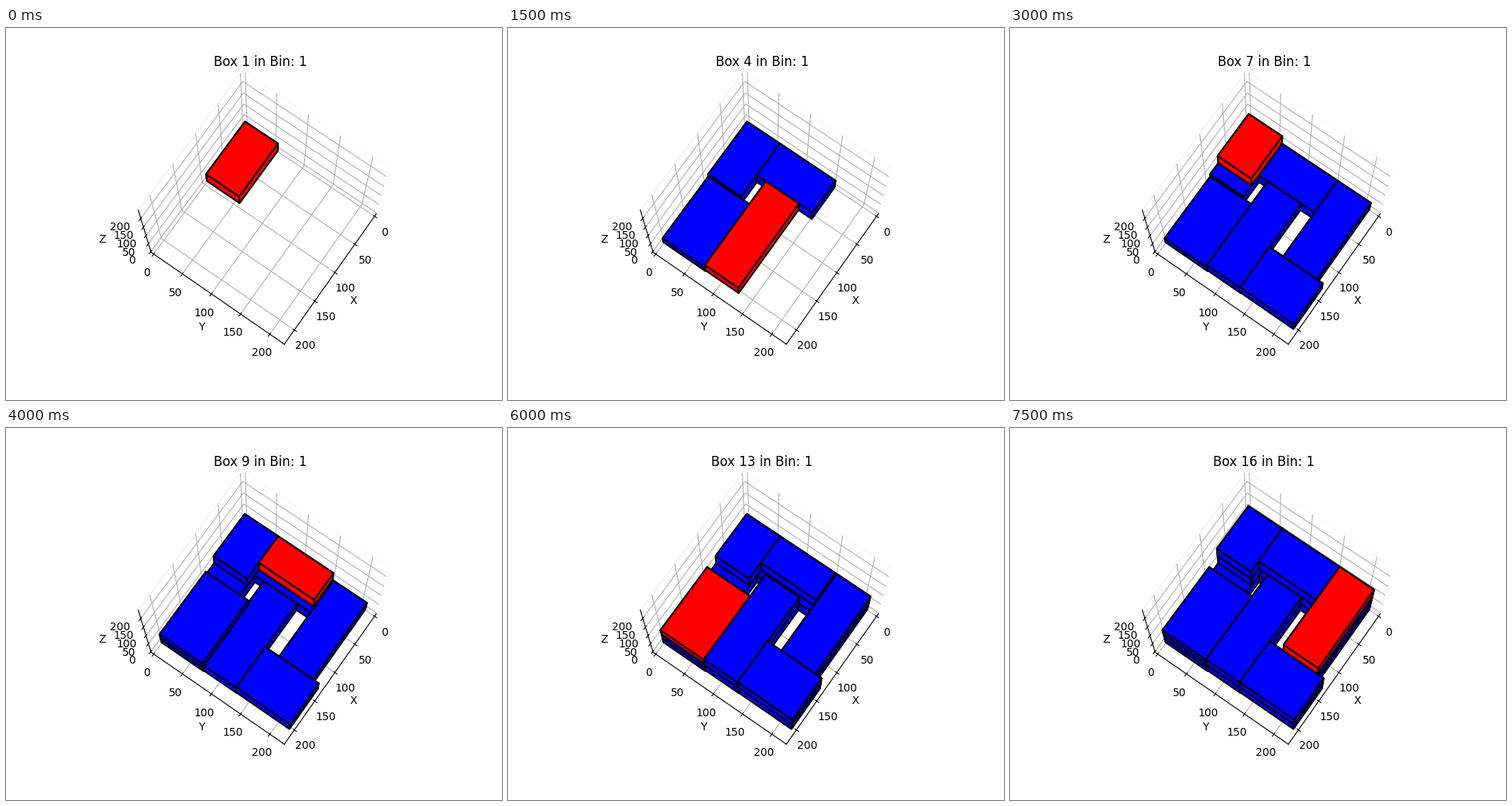
Recreate the animation shown at these times as a matplotlib script. Size 640 by 480 pixels, loop 8000 ms.

```python
from itertools import product

import matplotlib.pyplot as plt
import numpy as np
from matplotlib.animation import FuncAnimation
from mpl_toolkits.mplot3d.art3d import Poly3DCollection

BIN = (220, 220, 240)
MARGIN = 1 / 48
H, LOW = 37, 25

# position (x, y, z) and size (dx, dy, dz), in packing order
BOXES = [
    (0, 0, 0, 95, 57, H),
    (95, 0, 0, 110, 72.5, LOW),
    (0, 57, 0, 57, 95, H),
    (57, 72.5, 0, 147, 56.5, H),
    (133.5, 128.5, 0, 70, 90, H),
    (0, 152, 0, 133.5, 56.5, H),
    (0, 0, H, 75, 57, H),
    (95, 0, LOW, 110, 72.5, LOW),
    (0, 57, H, 47, 93, H),
    (0, 152, H, 133.5, 56.5, H),
    (57, 72.5, H, 147, 56.5, H),
    (133.5, 128.5, H, 70, 90, H),
    (95, 0, 2 * LOW, 110, 72.5, LOW),
    (0, 0, 2 * H, 75, 57, H),
    (0, 57, 2 * H, 57, 95, H),
    (0, 152, 2 * H, 133.5, 56.5, H),
]


def faces(box):
    """Six quads of a cuboid."""
    pos, size = np.array(box[:3]), np.array(box[3:])
    quads = []
    for axis, side in product(range(3), (0, 1)):
        u, v = [k for k in range(3) if k != axis]
        quad = np.zeros((4, 3))
        quad[:, axis] = side
        quad[:, u] = (0, 1, 1, 0)
        quad[:, v] = (0, 0, 1, 1)
        quads.append(pos + quad * size)
    return quads


fig = plt.figure(figsize=(6.4, 4.8), dpi=100)
ax = fig.add_subplot(projection="3d")
ax.set(xlabel="X", ylabel="Y", zlabel="Z")
ax.set_box_aspect((1, 1, 1))
ax.view_init(elev=75, azim=35)
for axis in (ax.xaxis, ax.yaxis, ax.zaxis):
    axis.pane.fill = False
    axis.set_ticks(range(0, 201, 50))
for set_lim, size in zip((ax.set_xlim, ax.set_ylim, ax.set_zlim), BIN):
    set_lim(0, size, view_margin=MARGIN)

solids = [
    ax.add_collection3d(
        Poly3DCollection(faces(box), facecolors="b", edgecolors="k", linewidths=1.5))
    for box in BOXES
]
title = ax.set_title("")


def update(i):
    for k, solid in enumerate(solids):
        solid.set_visible(k <= i)
        solid.set_facecolor("r" if k == i else "b")
    title.set_text(f"Box {i + 1} in Bin: 1")
    return [*solids, title]


anim = FuncAnimation(fig, update, frames=len(BOXES), interval=500,
                     repeat=True, repeat_delay=0, blit=False)
plt.show()
```
